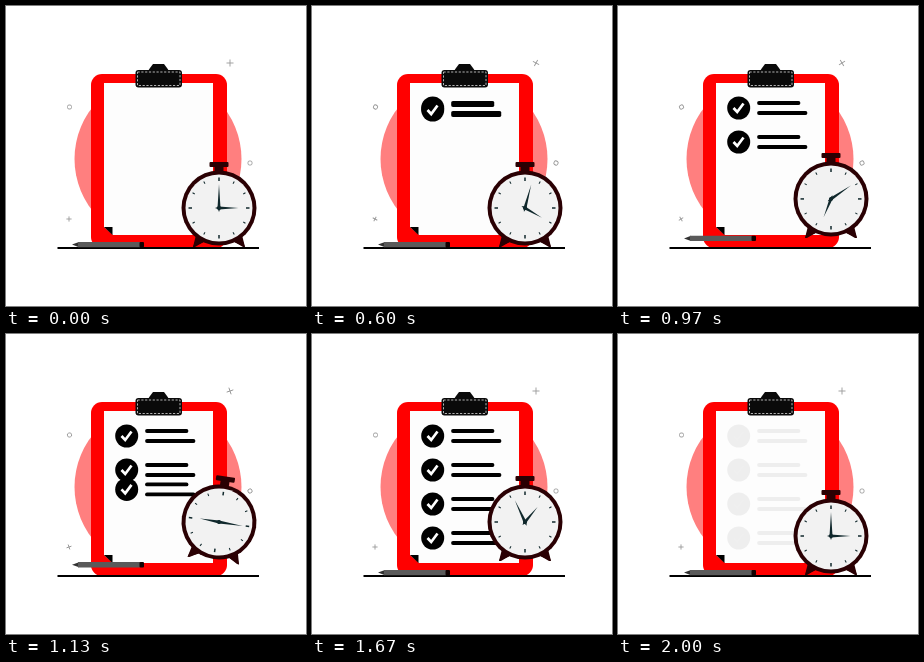
An HTML page with a canvas for the animation above (2.03 s loop, 300x300 px).

```html
<!DOCTYPE html>
<html lang="en">
<head>
<meta charset="utf-8">
<title>Checklist and clock</title>
<style>
html, body { margin: 0; width: 100%; height: 100%; overflow: hidden; background: #fff; }
canvas { display: block; width: 300px; height: 300px; }
</style>
</head>
<body>
<canvas id="stage" width="300" height="300"></canvas>
<script>
const c = document.getElementById('stage').getContext('2d');
const LOOP = 2030, TAU = Math.PI * 2, RAD = Math.PI / 180;
const DARK = '#2a0003', INK = '#10282c';
const ROW_TIMES = [[130, 400], [560, 830], [985, 1250], [1345, 1625]];
const HAND_KEYS = [[0, 0], [370, 5], [770, 29], [1130, 91], [1370, 195], [1670, 335], [1800, 360], [2030, 360]];

const part = (t, a, b) => Math.min(1, Math.max(0, (t - a) / (b - a)));
const ease = (t, a, b) => { const p = part(t, a, b); return p * p * (3 - 2 * p); };

// Smooth curve through [time, value] keys
function curve(keys, t) {
  const last = keys.length - 1;
  let i = 0;
  while (i < last - 1 && t >= keys[i + 1][0]) i++;
  const slope = k => {
    if (k === 0 || k >= last - 1) return 0;
    return (keys[k + 1][1] - keys[k - 1][1]) / (keys[k + 1][0] - keys[k - 1][0]);
  };
  const [t0, v0] = keys[i], [t1, v1] = keys[i + 1];
  const h = t1 - t0, u = (t - t0) / h, w = 1 - u;
  return v0 * (1 + 2 * u) * w * w + v1 * u * u * (3 - 2 * u)
    + h * u * w * (slope(i) * w - slope(i + 1) * u);
}

function disc(x, y, r, color) {
  c.fillStyle = color;
  c.beginPath();
  c.arc(x, y, r, 0, TAU);
  c.fill();
}

function rect(x, y, w, h, r, color) {
  c.fillStyle = color;
  c.beginPath();
  c.roundRect(x, y, w, h, r);
  c.fill();
}

function trace(points) {
  c.beginPath();
  for (let i = 0; i < points.length; i += 2) c.lineTo(points[i], points[i + 1]);
}

function poly(color, ...points) {
  c.fillStyle = color;
  trace(points);
  c.fill();
}

function line(color, width, ...points) {
  c.strokeStyle = color;
  c.lineWidth = width;
  trace(points);
  c.stroke();
}

function at(x, y, deg, draw) {
  c.save();
  c.translate(x, y);
  c.rotate(deg * RAD);
  draw();
  c.restore();
}

function decor(t) {
  const turn = 90 * ease(t, 0, 1600);
  for (const [x, y, r] of [[224, 57, 3.5], [63, 213, 2.6]])
    at(x, y, turn, () => {
      line('#999', 0.9, -r, 0, r, 0);
      line('#999', 0.9, 0, -r, 0, r);
    });
  for (const [x, y] of [[63.5, 101], [244, 157]])
    at(x, y, turn, () => {
      c.strokeStyle = '#999';
      c.lineWidth = 0.9;
      c.beginPath();
      c.roundRect(-2, -2, 4, 4, 1.5);
      c.stroke();
    });
}

function board() {
  disc(152, 153, 83.5, '#ff7f7f');
  rect(85, 68, 136, 174, 11, '#f00');
  poly('#fdfdfd', 98, 77, 207, 77, 207, 229, 107, 229, 98, 221);
  poly('#000', 98, 221, 106.5, 221, 106.5, 229);
}

function clip() {
  poly('#0a0a0a', 142, 65, 144, 62, 147, 58, 158, 58, 161, 62, 163, 65);
  rect(129.5, 64, 46.5, 17.5, 3, '#0a0a0a');
  c.save();
  c.setLineDash([2.2, 1.6]);
  c.strokeStyle = '#ddd';
  c.lineWidth = 0.8;
  c.strokeRect(131.5, 66, 42.5, 13.5);
  c.restore();
}

function row(y) {
  disc(120.7, y, 11.5, '#000');
  line('#fff', 2.7, 115.5, y, 119.2, y + 4, 125.5, y - 4.5);
  c.lineCap = 'round';
  line('#000', 3.8, 141, y - 5, 180.5, y - 5);
  line('#000', 3.8, 141, y + 5, 187.5, y + 5);
  c.lineCap = 'butt';
}

function rows(t) {
  c.save();
  c.beginPath();
  c.rect(98, 77, 109, 152);
  c.clip();
  c.globalAlpha = 1 - part(t, 1670, 2020);
  ROW_TIMES.forEach(([start, end], i) => {
    if (t > start) row(68 + 34 * (i + ease(t, start, end)));
  });
  c.restore();
}

function pen(t) {
  const lift = 8 * Math.sin(Math.PI * part(t, 700, 1490)) ** 2;
  at(0, 238.6 - lift, 0, () => {
    poly('#333', 66, 0, 73, -2.6, 73, 2.6);
    rect(72, -2.7, 62, 5.4, 0, '#5a5a5a');
    rect(133.5, -2.7, 4.5, 5.4, 1, '#120000');
  });
}

function hand(deg, length) {
  at(0, 0, deg, () => poly(INK, -1.5, 0, 0, -length, 1.5, 0, 0, 4));
}

function clock(t) {
  const y = 202 - 14 * (ease(t, 850, 1050) - ease(t, 1720, 1900));
  const tilt = 8.5 * Math.sin(3 * Math.PI * part(t, 1050, 1560));
  const angle = curve(HAND_KEYS, t);
  at(213, y, tilt, () => {
    rect(-9.5, -46, 19, 5, 1, DARK);
    rect(-4.5, -42, 9, 8, 0, DARK);
    for (const s of [-1, 1]) poly(DARK, s * 22, 28, s * 26, 39, s * 24, 39, s * 14, 33);
    for (const s of [-1, 1]) poly(DARK, s * 23, 27, s * 26, 39, s * 15, 34);
    disc(0, 0, 37.5, DARK);
    disc(0, 0, 33.5, '#f2f2f2');
    for (let i = 0; i < 12; i++)
      at(0, 0, i * 30, () => line(INK, i % 3 ? 1 : 1.5, 0, -30.5, 0, i % 3 ? -28 : -27));
    hand(angle, 24);
    hand(90 + 2 * angle, 19.5);
    disc(0, 0, 2, INK);
  });
}

function draw(now) {
  const t = now % LOOP;
  c.fillStyle = '#fff';
  c.fillRect(0, 0, 300, 300);
  decor(t);
  board();
  rows(t);
  clip();
  line('#000', 2, 51.5, 242, 253, 242);
  pen(t);
  clock(t);
}

let begin;
function tick(now) {
  begin ??= now;
  draw(now - begin);
  requestAnimationFrame(tick);
}
draw(0);
requestAnimationFrame(tick);
</script>
</body>
</html>
```
